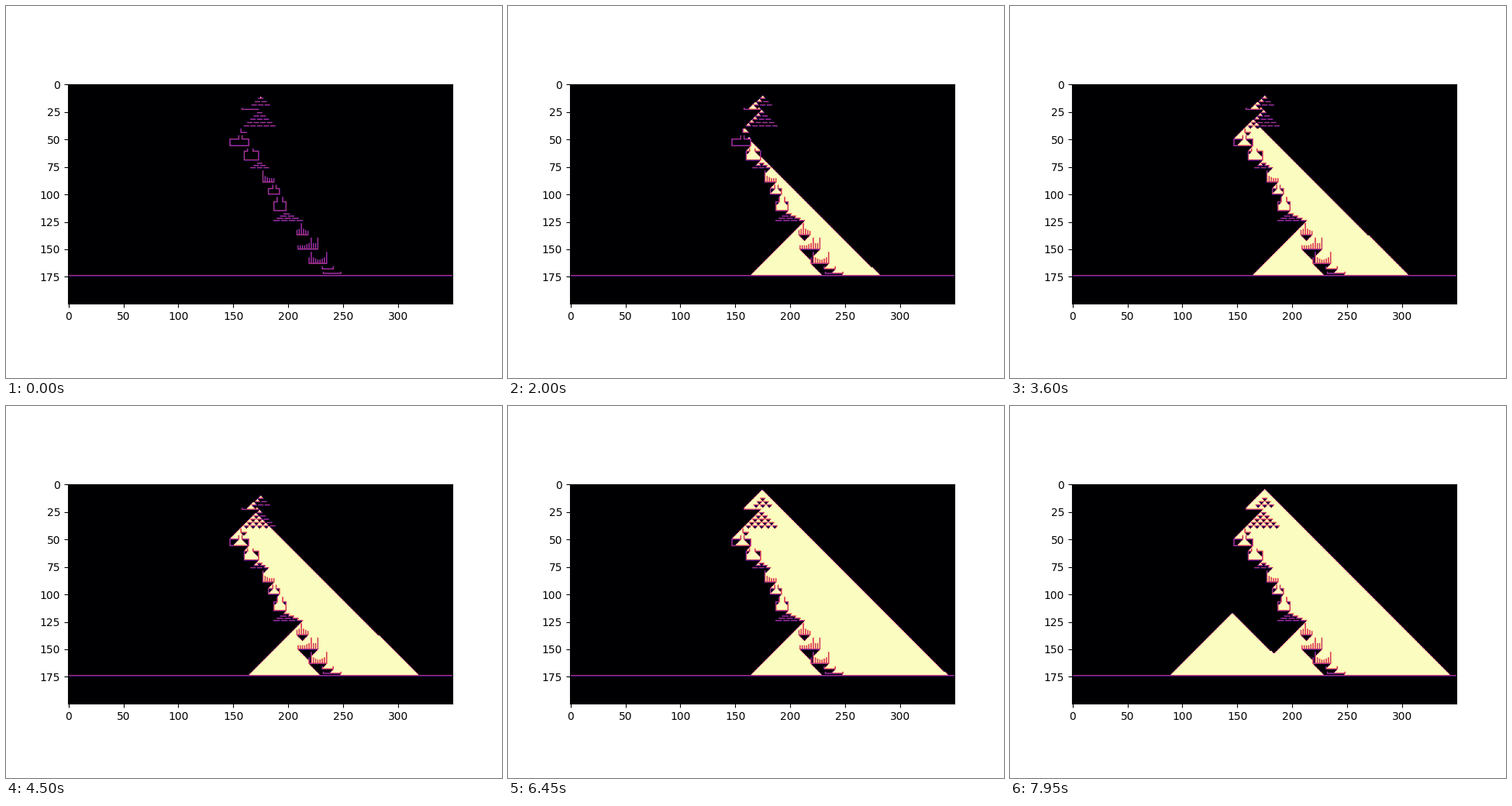
A matplotlib script that plays this animation: 640 by 480 pixels, repeating every 8000 ms.

```python
import numpy as np
import matplotlib.pyplot as plt
from matplotlib.animation import FuncAnimation

W, H = 350, 200
SOURCE = (175, 0)
FRAMES, INTERVAL, RATE = 160, 50, 100
AIR, ROCK, SAND = 0, 1, 2
GAP = 3  # rows from the base of one structure to the top of the next

cave = np.zeros((H, W))


def path(*points):
    for (xa, ya), (xb, yb) in zip(points, points[1:]):
        cave[min(ya, yb):max(ya, yb) + 1, min(xa, xb):max(xa, xb) + 1] = ROCK


# Every builder takes its left or top corner and returns the next free top row.
def pyramid(x, y, rows, size, dy):
    for r in range(rows):
        for k in range(r + 1):
            left = x - 3 * r + (size + 1) * k
            path((left, y + dy * r), (left + size - 1, y + dy * r))
    return y + dy * (rows - 1) + GAP


def tray(x, y, width, depth, right_lip=True):
    base, end = y + depth, x + width
    path((x, y), (x, base), (end, base), (end, y if right_lip else base))
    return base + GAP


def bottle(x, y, width, neck, body, left, right):
    end, shoulder, base = x + width, y + neck, y + neck + body
    path((x + left, y), (x + left, shoulder), (x, shoulder), (x, base),
         (end, base), (end, shoulder), (end - right, shoulder), (end - right, y))
    return base + GAP


def comb(x, y, teeth, *peaks):
    """Ten rows high at the peaks, falling off quickly to short teeth."""
    base = y + 10
    path((x, base), (x + 2 * teeth - 2, base))
    for k in range(teeth):
        away = min(abs(k - p) for p in peaks)
        path((x + 2 * k, base), (x + 2 * k, base - round(3 + 7 * 0.3 ** away)))
    return base + GAP


def build():
    y = pyramid(173, 13, 3, 5, 3)
    y = tray(158, y, 15, 1, right_lip=False)
    y = pyramid(172, y, 5, 5, 3)
    y = tray(157, y, 5, 3, right_lip=False)
    y = bottle(147, y, 17, 3, 6, 8, 6)
    y = bottle(160, y, 13, 2, 8, 3, 5)
    y = pyramid(172, y, 3, 5, 2)
    y = comb(177, y, 6, 0)
    y = bottle(182, y, 10, 3, 5, 4, 3)
    y = bottle(187, y, 11, 4, 8, 3, 3)
    y = pyramid(196, y, 4, 6, 2)
    y = comb(208, y, 6, 2)
    y = comb(209, y, 10, 6, 9)
    y = comb(219, y, 9, 1, 8)
    y = tray(231, y, 10, 2)
    y = tray(232, y, 16, 1)
    floor = y - GAP + 2
    path((0, floor), (W - 1, floor))


def pour(count):
    """Resting place of each grain; a new grain resumes the last one's trail."""
    grid = cave.copy()
    trail, rests = [SOURCE], []
    while trail and len(rests) < count:
        x, y = trail[-1]
        for nx in (x, x - 1, x + 1):
            if grid[y + 1, nx] == AIR:
                trail.append((nx, y + 1))
                break
        else:
            grid[y, x] = SAND
            rests.append(trail.pop())
    return np.array(rests)


build()
grains = pour(RATE * (FRAMES - 1) + 1)

fig, ax = plt.subplots(figsize=(6.4, 4.8), dpi=100)
image = ax.imshow(cave, cmap="magma", vmin=AIR, vmax=SAND,
                  interpolation="antialiased", interpolation_stage="data")


def draw(frame):
    grid = cave.copy()
    xs, ys = grains[:RATE * frame + 1].T
    grid[ys, xs] = SAND
    image.set_data(grid)
    return [image]


anim = FuncAnimation(fig, draw, frames=FRAMES, interval=INTERVAL, repeat=True)
plt.show()
```
